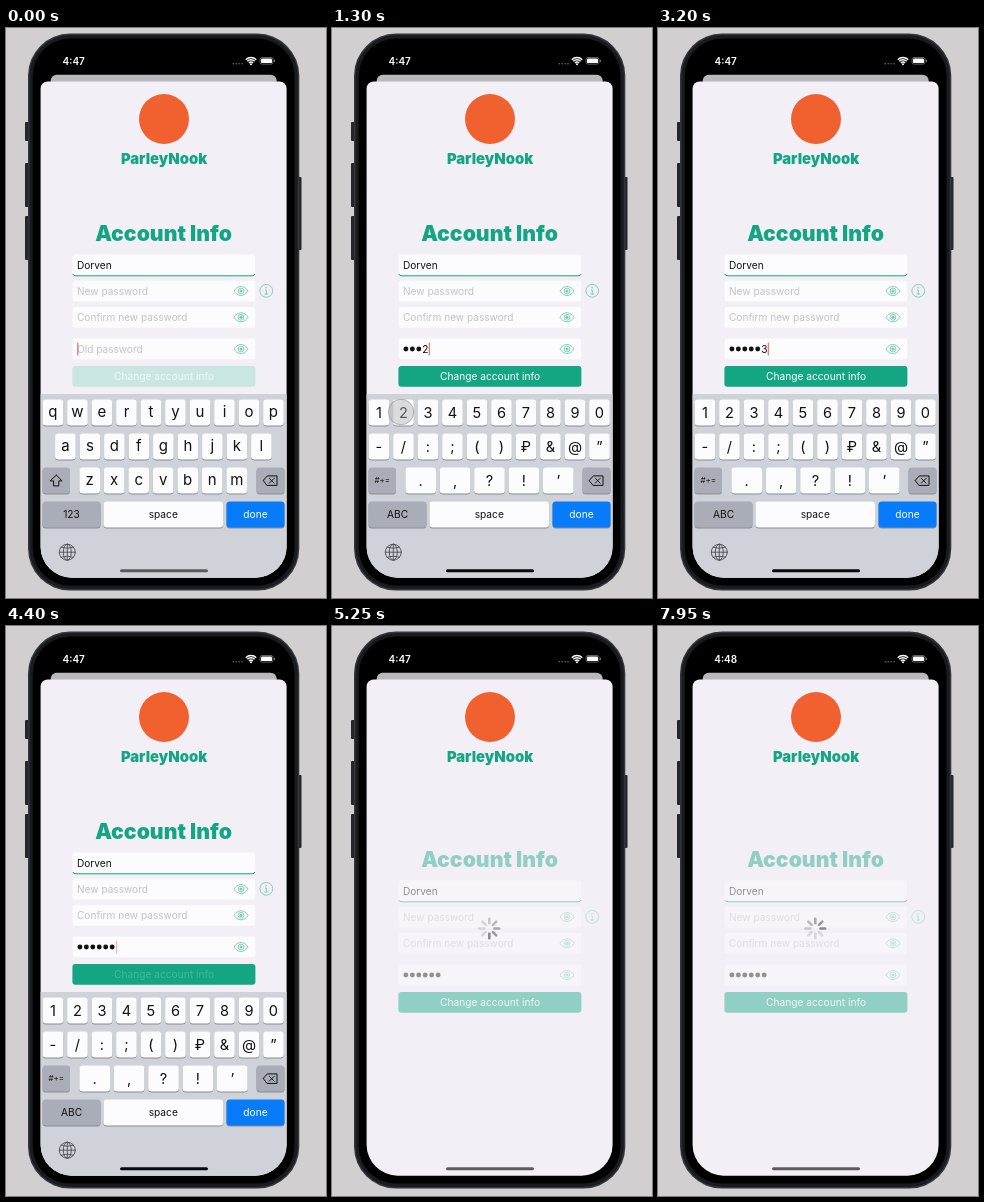
An HTML page with a canvas that plays this animation: 320 by 570 pixels, repeating every 8000 ms.

```html
<!DOCTYPE html>
<html lang="en">
<head>
<meta charset="utf-8">
<title>Account info</title>
<style>
  html, body { margin: 0; width: 100%; height: 100%; overflow: hidden; background: #d2cfd1; }
  canvas { display: block; width: 320px; height: 570px; }
</style>
</head>
<body>
<canvas id="stage"></canvas>
<script>
const LOOP = 8000;
const W = 320, H = 570;
const canvas = document.getElementById('stage');
const ratio = window.devicePixelRatio || 1;
canvas.width = W * ratio;
canvas.height = H * ratio;
const ctx = canvas.getContext('2d');

const GREEN = '#14a583', SHEET = '#f2f0f6', KEYBOARD = '#d0d2d9', SPECIAL = '#a9adb7', INK = '#111';

// Timeline, in ms
const MODE_SWITCH = 250;
const DISMISS = 4405;
const CLOCK_TICK = 5500;
const MASK_LAST = 3600;
const BLINK = 900;
const strokes = [[600, '3'], [850, '6'], [1070, '5'], [1290, '2'], [1510, '8'], [2120, '3']];
const taps = [[110, 260, 66, 487]].concat(
  strokes.map(([t, d]) => [t - 110, t + 40, 44.5 + (d - 1) * 24.5, 384]),
  [[4150, 4340, 158, 349]]
);

const clamp = v => Math.max(0, Math.min(1, v));
const mix = (a, b, p) => a + (b - a) * p;

function box(x, y, w, h, r, fill) {
  ctx.beginPath();
  ctx.roundRect(x, y, w, h, r);
  ctx.fillStyle = fill;
  ctx.fill();
}

function disc(x, y, r, fill) {
  ctx.beginPath();
  ctx.arc(x, y, r, 0, Math.PI * 2);
  ctx.fillStyle = fill;
  ctx.fill();
}

// y is the middle of the capital letters
function label(str, x, y, size, fill, weight = 400, align = 'left') {
  ctx.font = `${weight} ${size}px Inter, "Liberation Sans", sans-serif`;
  ctx.textAlign = align;
  ctx.textBaseline = 'alphabetic';
  ctx.fillStyle = fill;
  ctx.fillText(str, x, y + size * 0.364);
}

function line(points, color, width = 1, closed = false) {
  ctx.beginPath();
  points.forEach(([x, y]) => ctx.lineTo(x, y));
  if (closed) ctx.closePath();
  ctx.strokeStyle = color;
  ctx.lineWidth = width;
  ctx.lineJoin = ctx.lineCap = 'round';
  ctx.stroke();
}

function drawPhone() {
  ctx.fillStyle = '#d2cfd1';
  ctx.fillRect(0, 0, W, H);
  [[94, 19], [135, 44], [188, 44]].forEach(([y, h]) => box(19, y, 5, h, 1, '#24262c'));
  box(291, 149, 4.5, 73, 1, '#24262c');
  box(22, 5.6, 271.3, 557, 42, '#34363c');
  box(23.5, 7.1, 268.3, 554, 40.5, '#1a1b20');
  box(26.8, 10.6, 261.7, 547, 37, '#000');
}

function drawStatus(t) {
  label(t < CLOCK_TICK ? '4:47' : '4:48', 67.7, 32.9, 10, '#fff', 600, 'center');
  for (let i = 0; i < 4; i++) disc(227.3 + i * 2.9, 35.8, 0.8, '#69696c');
  ctx.strokeStyle = '#fff';
  ctx.lineCap = 'butt';
  ctx.lineWidth = 1.5;
  [2.9, 5.2, 7.4].forEach(r => {
    ctx.beginPath();
    ctx.arc(245, 37, r, -Math.PI * 0.75, -Math.PI * 0.25);
    ctx.stroke();
  });
  disc(245, 36.3, 1, '#fff');
  ctx.beginPath();
  ctx.roundRect(254, 29.5, 13, 6.6, 2);
  ctx.strokeStyle = '#8c8c8e';
  ctx.lineWidth = 0.7;
  ctx.stroke();
  box(255, 30.5, 11, 4.6, 1.2, '#fff');
  box(267.8, 31.6, 1, 2.4, 0.5, '#8c8c8e');
}

function drawEye(y) {
  const x = 235;
  ctx.strokeStyle = '#78ccb5';
  ctx.lineWidth = 0.9;
  ctx.beginPath();
  ctx.moveTo(x - 7, y);
  ctx.bezierCurveTo(x - 3.5, y - 6, x + 3.5, y - 6, x + 7, y);
  ctx.bezierCurveTo(x + 3.5, y + 6, x - 3.5, y + 6, x - 7, y);
  ctx.moveTo(x + 2.9, y);
  ctx.arc(x, y, 2.9, 0, Math.PI * 2);
  ctx.stroke();
  disc(x, y, 1.6, '#78ccb5');
}

function drawInfo(x, y) {
  ctx.beginPath();
  ctx.arc(x, y, 6.4, 0, Math.PI * 2);
  ctx.strokeStyle = '#78ccb5';
  ctx.lineWidth = 0.9;
  ctx.stroke();
  disc(x - 0.2, y - 3, 0.8, '#78ccb5');
  line([[x - 1.2, y - 0.8], [x, y - 0.8], [x, y + 3.2]], '#78ccb5', 0.9);
  line([[x - 1.5, y + 3.2], [x + 1.5, y + 3.2]], '#78ccb5', 0.9);
}

function drawPassword(t, y) {
  const typed = strokes.filter(([at]) => at <= t);
  const n = typed.length;
  let end = 71;
  if (!n) {
    label('Old password', 71, y, 10.1, '#c3c2c7');
  } else {
    const masked = t >= MASK_LAST ? n : n - 1;
    for (let i = 0; i < masked; i++) disc(73.9 + i * 6.45, y, 2.45, INK);
    end = 71 + masked * 6.45;
    if (masked < n) {
      const last = typed[n - 1][1];
      label(last, end, y, 10.1, INK);
      end += ctx.measureText(last).width;
    }
  }
  // The caret's blink restarts with every stroke
  const age = (t - (n ? typed[n - 1][0] : -200)) % BLINK;
  const alpha = Math.max(clamp((530 - age) / 100), clamp((age - BLINK) / 100 + 1));
  if (t < DISMISS && alpha > 0) {
    ctx.save();
    ctx.globalAlpha *= alpha;
    box(end + 0.2, y - 6.5, 1.2, 13, 0.6, '#e8714f');
    ctx.restore();
  }
}

function drawForm(t, p) {
  const fade = clamp((t - DISMISS) / 130);
  ctx.save();
  ctx.translate(0, 28 * p);
  ctx.globalAlpha = mix(1, 0.44, fade);
  label('Account Info', 157.5, 205.3, 21.2, GREEN, 900, 'center');

  [226.5, 252.7, 279, 310.5].forEach(y => box(66.6, y, 182.6, 20.8, 2.5, '#fcfbfe'));
  ctx.beginPath();
  ctx.moveTo(66.8, 246);
  ctx.quadraticCurveTo(67.2, 247.8, 70, 247.8);
  ctx.lineTo(246, 247.8);
  ctx.quadraticCurveTo(248.6, 247.8, 249, 246);
  ctx.strokeStyle = GREEN;
  ctx.lineWidth = 1;
  ctx.stroke();

  label('Dorven', 71, 237, 10.1, INK);
  label('New password', 71, 263.2, 10.1, '#c3c2c7');
  label('Confirm new password', 71, 289.5, 10.1, '#c3c2c7');
  [263, 289.3, 321].forEach(drawEye);
  drawInfo(260.3, 262.8);
  drawPassword(t, 321);

  const ready = t >= strokes[0][0];
  const pressed = t >= 4230 && t < DISMISS + 20;
  box(66.4, 338, 183, 20.8, 3, ready ? GREEN : '#c9e6e2');
  ctx.globalAlpha = 1;
  const ink = !ready ? 'rgba(255,255,255,.75)' : pressed ? 'rgba(255,255,255,.2)' : `rgba(255,255,255,${mix(1, 0.85, fade)})`;
  label('Change account info', 158, 348.6, 10.2, ink, 400, 'center');
  ctx.restore();
}

function drawKey(x, y, w, text, size, fill = '#fcfcfe', ink = INK) {
  box(x, y + 1, w, 26, 3.2, '#8b8d94');
  box(x, y, w, 26, 3.2, fill);
  if (text) label(text, x + w / 2, y + 13, size, ink, 400, 'center');
}

function drawRow(keys, mid, y, pitch, width, size, lift = 0) {
  [...keys].forEach((k, i) => {
    const x = mid + (i - (keys.length - 1) / 2) * pitch - width / 2;
    drawKey(x, y, width, '');
    label(k, x + width / 2, y + 13 - lift, size, INK, 400, 'center');
  });
}

function drawGlobe(x, y) {
  ctx.strokeStyle = '#4c4e54';
  ctx.lineWidth = 0.9;
  ctx.beginPath();
  ctx.arc(x, y, 8, 0, Math.PI * 2);
  ctx.moveTo(x + 4, y);
  ctx.ellipse(x, y, 4, 8, 0, 0, Math.PI * 2);
  ctx.moveTo(x - 8, y);
  ctx.lineTo(x + 8, y);
  ctx.moveTo(x, y - 8);
  ctx.lineTo(x, y + 8);
  [-1, 1].forEach(s => {
    ctx.moveTo(x - 6.3, y + s * 5);
    ctx.quadraticCurveTo(x, y + s * 2.8, x + 6.3, y + s * 5);
  });
  ctx.stroke();
}

function drawKeyboard(t, p) {
  const digits = t >= MODE_SWITCH;
  ctx.save();
  ctx.translate(-0.5, 0.4 + 184 * p);
  ctx.fillStyle = KEYBOARD;
  ctx.fillRect(34, 365.6, 248, 190);

  if (digits) {
    drawRow('1234567890', 157.7, 371, 24.5, 20.6, 14.6);
    drawRow('-/:;()₽&@”', 157.7, 405, 24.5, 20.6, 14.6);
    drawRow('.,?!’', 158, 439, 34.4, 30.6, 14.6);
    drawKey(37, 439, 27.5, '#+=', 8, SPECIAL);
  } else {
    drawRow('qwertyuiop', 157.7, 371, 24.5, 20.6, 15, 1.3);
    drawRow('asdfghjkl', 157.9, 405, 24.5, 20.6, 15, 1.3);
    drawRow('zxcvbnm', 157.7, 439, 24.5, 20.6, 15, 1.3);
    drawKey(37, 439, 27.5, '', 0, SPECIAL);
    line([[50.7, 446.5], [56.5, 452.5], [53.3, 452.5], [53.3, 457.5],
      [48.1, 457.5], [48.1, 452.5], [44.9, 452.5]], INK, 1, true);
  }
  drawKey(251, 439, 28, '', 0, SPECIAL);
  line([[257.5, 452.3], [261.8, 447.5], [271.5, 447.5], [271.5, 457], [261.8, 457]], INK, 1, true);
  line([[263.8, 449.9], [268.6, 454.7]], INK);
  line([[268.6, 449.9], [263.8, 454.7]], INK);

  drawKey(37, 473, 58, digits ? 'ABC' : '123', 10.2, SPECIAL);
  drawKey(98, 473, 119.5, 'space', 10.2);
  drawKey(221, 473, 58, 'done', 10.2, '#087bfb', '#fff');
  drawGlobe(61.8, 523.8);
  ctx.restore();
}

function drawSpinner(t, p) {
  if (t < DISMISS) return;
  const head = Math.floor(((t / 1000 + 0.3) % 1) * 8);
  ctx.save();
  ctx.translate(157.3, 274.5 + 28 * p);
  ctx.globalAlpha = clamp((t - DISMISS) / 100);
  for (let i = 0; i < 8; i++) {
    const behind = (head - i + 8) % 8;
    const a = i * Math.PI / 4;
    const s = Math.sin(a), c = -Math.cos(a);
    line([[s * 5.2, c * 5.2], [s * 9.8, c * 9.8]], `rgba(90,90,96,${mix(0.68, 0.2, Math.min(behind, 5) / 5)})`, 2.6);
  }
  ctx.restore();
}

function drawTaps(t) {
  taps.forEach(([from, to, x, y]) => {
    const a = Math.min(clamp((t - from) / 40), clamp((to - t) / 50));
    if (!a) return;
    ctx.save();
    ctx.globalAlpha = a;
    disc(x, y, 12.7, 'rgba(178,178,181,.75)');
    ctx.strokeStyle = 'rgba(100,100,105,.65)';
    ctx.lineWidth = 1;
    ctx.stroke();
    ctx.restore();
  });
}

function draw(t) {
  const s = Math.max(0, t - DISMISS) * 0.029;
  const p = 1 - Math.exp(-s) * (1 + s);

  ctx.setTransform(ratio, 0, 0, ratio, 0, 0);
  drawPhone();
  drawStatus(t);
  box(44.7, 46.7, 226, 20, [6, 6, 0, 0], '#b9b8bb');

  ctx.save();
  ctx.beginPath();
  ctx.roundRect(34.6, 53.5, 246, 496.2, [7, 7, 31, 31]);
  ctx.clip();
  ctx.fillStyle = SHEET;
  ctx.fillRect(34, 53, 248, 498);
  disc(158, 91, 25, '#f1602f');
  label('ParleyNook', 158, 131, 14.8, GREEN, 900, 'center');
  drawForm(t, p);
  drawSpinner(t, p);
  if (p < 0.999) drawKeyboard(t, p);
  const dim = Math.max(1 - clamp((t - 50) / 300), clamp((t - DISMISS) / 140));
  const shade = Math.round(mix(8, 92, dim));
  box(114, 541.2, 88, 3, 1.5, `rgb(${shade},${shade},${shade + 2})`);
  ctx.restore();

  drawTaps(t);
}

const start = performance.now();
function tick() {
  draw((performance.now() - start) % LOOP);
  requestAnimationFrame(tick);
}
tick();
</script>
</body>
</html>
```
